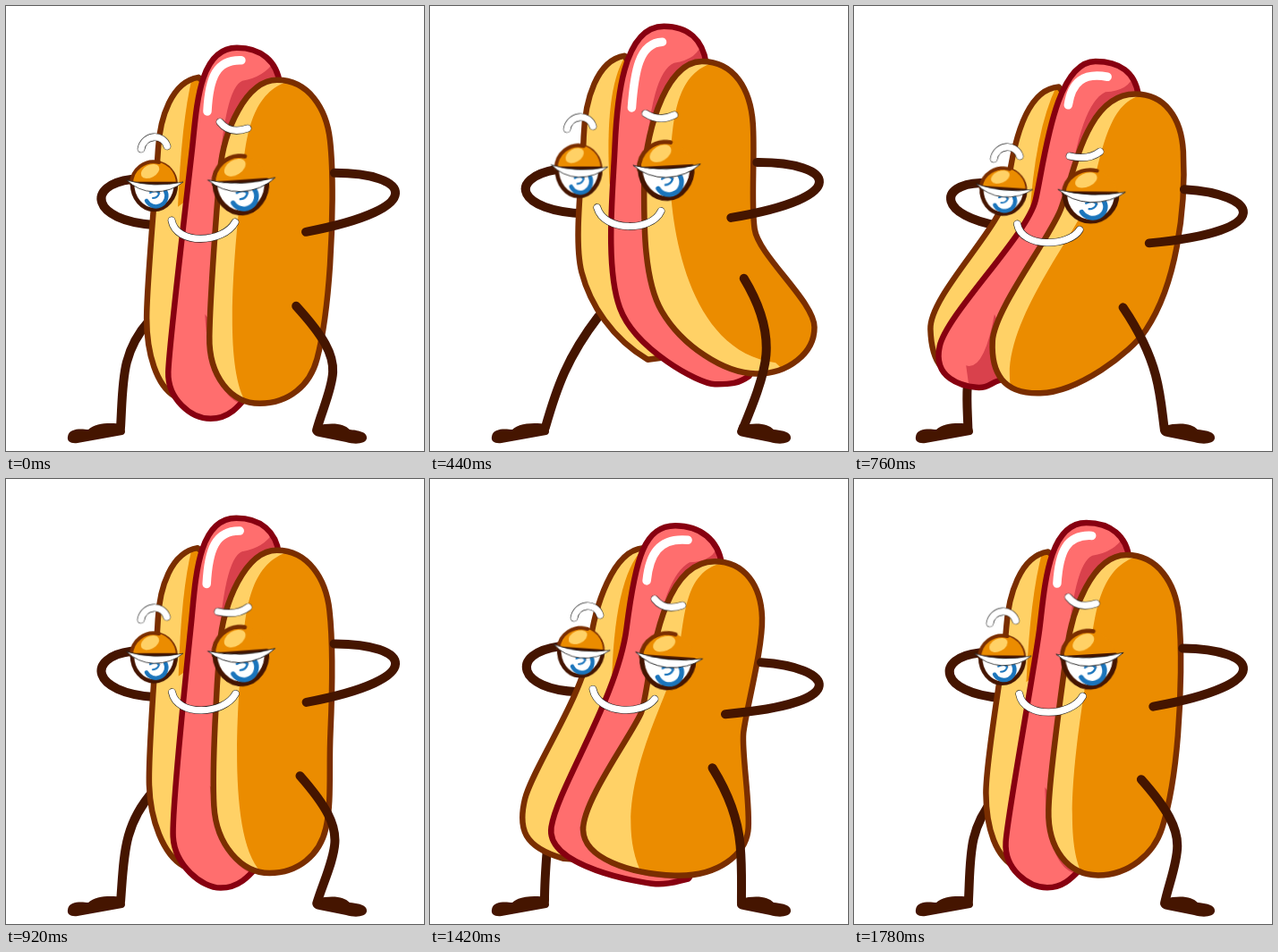
An HTML page without scripts for the animation above (1800 ms loop, 467 px wide and 498 px high).

```html
<!DOCTYPE html>
<html lang="en">
<head>
<meta charset="utf-8">
<title>Dancing hot dog</title>
<style>
html,body{margin:0;width:100%;height:100%;overflow:hidden;background:#fff}
svg{display:block;width:100vw;height:100vh}
path,g{animation:none 900ms linear infinite}
path{stroke-linecap:round;stroke-linejoin:round}
.limb{fill:none;stroke:#451500;stroke-width:10}
.crust{stroke:#7a2e00;stroke-width:6.5}
.skin{stroke:#870010;stroke-width:6.5}
.ink{fill:none;stroke:#222;stroke-width:8.6}
.chalk{fill:none;stroke:#fff;stroke-width:7.4}

.bun{animation-name:bun}
.glaze{animation-name:glaze}
.meat{animation-name:meat}
.gloom{animation-name:gloom}
.back{animation-name:back}
.shade{animation-name:shade}
.shine{animation-name:shine}
.legL{animation-name:legL}
.legR{animation-name:legR}
.armL{animation-name:armL}
.armR{animation-name:armR}
.smile{animation-name:smile}
.eyeL{animation-name:eyeL}
.eyeR{animation-name:eyeR}
.browL{animation-name:browL}
.browR{animation-name:browR}
.arch{animation-name:arch;animation-duration:1800ms}

/* body: upright, hip right, furthest right, swinging back, hip left */
@keyframes bun{
0%,to{d:path("M303 83C338 83 358 115 362 150S365 245 362 290 355 365 347 395 315 445 283 445 226 415 227 370 235 230 239 185 268 83 303 83Z");animation-timing-function:cubic-bezier(.33,.5,.67,.83)}
28.889%{d:path("M300 56C335 56 354 90 357 125S360 210 366 240 432 332 434 362 408 411 380 411 300 370 272 333 240 217 239 180 262 56 300 56Z")}
37.778%{d:path("M300 54C338 54 355 88 358 125S360 208 366 240 448 320 449 350 420 403 388 403 310 368 282 328 243 215 240 175 262 54 300 54Z");animation-timing-function:cubic-bezier(.35,-.25,.75,.4)}
57.778%{d:path("M318 92C352 92 370 120 371 155S352 262 350 285 359 370 356 395 325 446 275 444 173 425 172 393 226 286 236 262 250 92 318 92Z");animation-timing-function:cubic-bezier(.3,.4,.6,.95)}
66.667%{d:path("M320 107C352 107 370 130 371 170S369 225 360 258 338 320 315 345 215 425 168 427 114 408 116 378 206 282 226 252 252 107 320 107Z");animation-timing-function:cubic-bezier(.4,0,.7,.6)}
}
@keyframes glaze{
0%,to{d:path("M318 84C275 95 268 145 264 190S238 400 268 445L470 480 470 50Z");animation-timing-function:cubic-bezier(.33,.5,.67,.83)}
28.889%{d:path("M315 58C272 70 268 120 266 170S295 395 412 402L470 480 470 50Z")}
37.778%{d:path("M312 56C272 70 268 120 266 165S300 392 425 387L470 480 470 50Z");animation-timing-function:cubic-bezier(.35,-.25,.75,.4)}
57.778%{d:path("M325 94C285 105 285 150 278 195S195 360 240 445L470 480 470 50Z");animation-timing-function:cubic-bezier(.3,.4,.6,.95)}
66.667%{d:path("M318 110C285 120 280 190 262 228S112 345 128 428L470 480 470 50Z");animation-timing-function:cubic-bezier(.4,0,.7,.6)}
}
@keyframes meat{
0%,to{d:path("M258 47C285 47 303 62 306 88S278 425 270 435 250 462 228 462 180 440 181 410 203 205 208 160 215 47 258 47Z");animation-timing-function:cubic-bezier(.33,.5,.67,.83)}
28.889%{d:path("M252 20C278 20 294 32 298 58S385 402 370 413 345 425 328 425 251 372 229 330 200 195 201 150 205 20 252 20Z")}
37.778%{d:path("M258 15C285 15 300 30 304 56S386 395 374 405 354 415 335 415 255 370 232 324 203 195 203 155 208 15 258 15Z");animation-timing-function:cubic-bezier(.35,-.25,.75,.4)}
57.778%{d:path("M274 52C302 52 322 68 326 95S305 445 292 448 270 455 255 454 130 435 137 390 210 245 220 165 240 52 274 52Z");animation-timing-function:cubic-bezier(.3,.4,.6,.95)}
66.667%{d:path("M276 70C302 70 320 80 324 106S150 407 122 406 100 410 88 408 38 405 50 365 188 285 200 248 228 70 276 70Z");animation-timing-function:cubic-bezier(.4,0,.7,.6)}
}
@keyframes gloom{
0%,to{d:path("M300 62Q288 80 264 84Q244 92 237 200L270 180 312 90ZM222 345Q226 425 258 444L275 450 290 430Z");animation-timing-function:cubic-bezier(.33,.5,.67,.83)}
28.889%{d:path("M294 36Q288 56 260 60Q236 72 234 180L265 160 304 62ZM270 330Q310 400 372 412L376 406 380 400Z")}
37.778%{d:path("M298 32Q296 50 268 56Q242 66 238 180L265 160 308 58ZM285 335Q315 385 378 402L382 396 385 390Z");animation-timing-function:cubic-bezier(.35,-.25,.75,.4)}
57.778%{d:path("M322 72Q318 92 290 93Q262 108 248 200L285 150 330 98ZM168 390Q172 430 250 446L292 450 250 400Z");animation-timing-function:cubic-bezier(.3,.4,.6,.95)}
66.667%{d:path("M320 84Q318 103 290 103Q258 118 240 220L285 150 328 110ZM122 345Q102 400 54 380L50 414 140 412Z");animation-timing-function:cubic-bezier(.4,0,.7,.6)}
}
@keyframes back{
0%,to{d:path("M215 80C185 85 172 125 170 160S157 310 157 350 168 425 188 437L240 400 240 100Z");animation-timing-function:cubic-bezier(.33,.5,.67,.83)}
28.889%{d:path("M207 56C180 60 168 95 168 135S172 250 182 285 232 385 275 404L300 390 240 100Z")}
37.778%{d:path("M212 50C182 55 170 95 170 135S172 245 186 282 230 362 268 388L300 380 240 100Z");animation-timing-function:cubic-bezier(.35,-.25,.75,.4)}
57.778%{d:path("M238 77C205 80 184 140 178 190S115 325 107 358 105 412 150 425L220 430 250 100Z");animation-timing-function:cubic-bezier(.3,.4,.6,.95)}
66.667%{d:path("M236 96C190 98 178 190 172 232S45 330 47 368 60 410 115 413L150 400 250 120Z");animation-timing-function:cubic-bezier(.4,0,.7,.6)}
}
@keyframes shade{
0%,to{d:path("M208 80Q196 130 192 225L225 200 230 80Z");animation-timing-function:cubic-bezier(.33,.5,.67,.83)}
28.889%{d:path("M206 58Q192 90 198 190L225 180 230 58Z")}
37.778%{d:path("M212 52Q192 90 200 190L225 180 230 55Z");animation-timing-function:cubic-bezier(.35,-.25,.75,.4)}
57.778%{d:path("M238 78Q205 110 203 235L230 200 250 90Z");animation-timing-function:cubic-bezier(.3,.4,.6,.95)}
66.667%{d:path("M236 95Q205 145 198 250L225 210 250 100Z");animation-timing-function:cubic-bezier(.4,0,.7,.6)}
}
@keyframes shine{
0%,to{d:path("M225 118C227 80 235 60 263 61");animation-timing-function:cubic-bezier(.33,.5,.67,.83)}
28.889%{d:path("M218 114C220 70 227 40 248 36")}
37.778%{d:path("M221 114C224 70 228 35 252 33");animation-timing-function:cubic-bezier(.35,-.25,.75,.4)}
57.778%{d:path("M242 114C245 85 255 65 288 68");animation-timing-function:cubic-bezier(.3,.4,.6,.95)}
66.667%{d:path("M247 107C252 87 268 82 294 89");animation-timing-function:cubic-bezier(.4,0,.7,.6)}
}

/* limbs */
@keyframes legL{
0%,to{d:path("M160 352C128 388 131 420 128 472");animation-timing-function:cubic-bezier(.33,.5,.67,.83)}
28.889%{d:path("M200 328C155 380 140 420 129 472")}
37.778%{d:path("M203 330C160 380 145 420 129 472");animation-timing-function:cubic-bezier(.35,-.25,.75,.4)}
57.778%{d:path("M131 415C129 440 128 455 128 472");animation-timing-function:cubic-bezier(.3,.4,.6,.95)}
66.667%{d:path("M120 410C121 440 124 455 127 472");animation-timing-function:cubic-bezier(.4,0,.7,.6)}
}
@keyframes legR{
0%,to{d:path("M324 336C355 370 366 390 365 410S352 455 347 475");animation-timing-function:cubic-bezier(.33,.5,.67,.83)}
28.889%{d:path("M362 304C380 335 388 360 385 385S362 450 349 475")}
37.778%{d:path("M360 300C378 330 386 360 383 385S362 450 349 475");animation-timing-function:cubic-bezier(.35,-.25,.75,.4)}
57.778%{d:path("M316 323C336 355 345 385 347 410S348 450 348 475");animation-timing-function:cubic-bezier(.3,.4,.6,.95)}
66.667%{d:path("M288 338C302 365 312 390 322 415S340 455 347 475");animation-timing-function:cubic-bezier(.4,0,.7,.6)}
}
@keyframes armL{
0%,to{d:path("M140 194C90 200 94 240 165 245");animation-timing-function:cubic-bezier(.33,.5,.67,.83)}
28.889%{d:path("M140 184C86 196 99 234 172 236")}
37.778%{d:path("M140 182C86 192 97 228 175 231");animation-timing-function:cubic-bezier(.35,-.25,.75,.4)}
57.778%{d:path("M145 187C88 195 98 236 165 238");animation-timing-function:cubic-bezier(.3,.4,.6,.95)}
66.667%{d:path("M142 200C95 200 95 232 162 247");animation-timing-function:cubic-bezier(.4,0,.7,.6)}
}
@keyframes armR{
0%,to{d:path("M367 187C450 187 476 226 335 253");animation-timing-function:cubic-bezier(.33,.5,.67,.83)}
28.889%{d:path("M364 165C452 163 474 202 340 227")}
37.778%{d:path("M364 167C452 165 474 204 338 230");animation-timing-function:cubic-bezier(.35,-.25,.75,.4)}
57.778%{d:path("M370 205C448 210 478 250 330 263");animation-timing-function:cubic-bezier(.3,.4,.6,.95)}
66.667%{d:path("M370 215C450 222 477 266 327 272");animation-timing-function:cubic-bezier(.4,0,.7,.6)}
}

/* face */
@keyframes smile{
0%,to{d:path("M185 240C190 268 243 266 256 242");animation-timing-function:cubic-bezier(.33,.5,.67,.83)}
28.889%{d:path("M189 228C198 254 250 250 260 228")}
37.778%{d:path("M188 223C196 250 250 250 260 225");animation-timing-function:cubic-bezier(.35,-.25,.75,.4)}
57.778%{d:path("M182 235C188 264 238 264 251 246");animation-timing-function:cubic-bezier(.3,.4,.6,.95)}
66.667%{d:path("M181 246C186 274 240 271 250 255");animation-timing-function:cubic-bezier(.4,0,.7,.6)}
}
@keyframes eyeL{
0%,to{transform:translate(0,0) rotate(0deg) scale(1,1);animation-timing-function:cubic-bezier(.33,.5,.67,.83)}
28.889%{transform:translate(-1px,-14px) rotate(-1deg) scale(1,1.05)}
37.778%{transform:translate(0,-19px) rotate(-1deg) scale(1,1.07);animation-timing-function:cubic-bezier(.35,-.25,.75,.4)}
57.778%{transform:translate(3px,-8px) rotate(4deg) scale(1,1);animation-timing-function:cubic-bezier(.3,.4,.6,.95)}
66.667%{transform:translate(2px,9px) rotate(6deg) scale(1,.93);animation-timing-function:cubic-bezier(.4,0,.7,.6)}
}
@keyframes eyeR{
0%,to{transform:translate(0,0) rotate(-4deg) scale(1,1);animation-timing-function:cubic-bezier(.33,.5,.67,.83)}
28.889%{transform:translate(0,-20px) rotate(-6deg) scale(1,1)}
37.778%{transform:translate(1px,-21px) rotate(-5deg) scale(1,1);animation-timing-function:cubic-bezier(.35,-.25,.75,.4)}
57.778%{transform:translate(3px,3px) rotate(4deg) scale(1,.96);animation-timing-function:cubic-bezier(.3,.4,.6,.95)}
66.667%{transform:translate(3px,19px) rotate(3deg) scale(1,.85);animation-timing-function:cubic-bezier(.4,0,.7,.6)}
}
@keyframes browL{
0%,to{transform:translate(0,0);animation-timing-function:cubic-bezier(.33,.5,.67,.83)}
28.889%{transform:translate(-3px,-22px)}
37.778%{transform:translate(0,-27px);animation-timing-function:cubic-bezier(.35,-.25,.75,.4)}
57.778%{transform:translate(10px,-5px);animation-timing-function:cubic-bezier(.3,.4,.6,.95)}
66.667%{transform:translate(8px,17px);animation-timing-function:cubic-bezier(.4,0,.7,.6)}
}
@keyframes browR{
0%,to{transform:translate(0,0);animation-timing-function:cubic-bezier(.33,.5,.67,.83)}
28.889%{transform:translate(-3px,-22px)}
37.778%{transform:translate(0,-25px);animation-timing-function:cubic-bezier(.35,-.25,.75,.4)}
57.778%{transform:translate(12px,4px);animation-timing-function:cubic-bezier(.3,.4,.6,.95)}
66.667%{transform:translate(6px,26px);animation-timing-function:cubic-bezier(.4,0,.7,.6)}
}
@keyframes arch{
0%,21%,63%,to{d:path("M239 130Q250 144 270 137")}
29%,56%{d:path("M237 151Q258 156 271 146")}
}
</style>
</head>
<body>
<svg viewBox="0 0 467 498">
  <defs>
    <clipPath id="inBun"><path class="bun"/></clipPath>
    <clipPath id="inMeat"><path class="meat"/></clipPath>
    <clipPath id="inBack"><path class="back"/></clipPath>
    <g id="eye" fill="none">
      <path d="M-25-4A25 25 0 0 1 25-4Z" fill="#eb8c00"/>
      <path d="M-25-4A25 25 0 0 1 6-28" stroke="#7a2e00" stroke-width="4"/>
      <ellipse cx="-4" cy="-18" rx="11" ry="7" transform="rotate(-28 -4 -18)" fill="#ffd166"/>
      <path d="M-24-4A24.5 29 0 0 0 25-4Z" fill="#fff" stroke="#451500" stroke-width="4.6"/>
      <path d="M13 4A11.5 11.5 0 0 1-8 15" stroke="#1b75bc" stroke-width="4.5"/>
      <path d="M-4 6Q3 2 6 7Q4 12-1 12" stroke="#1b75bc" stroke-width="2"/>
      <path d="M-5 4Q4 1 7 6" stroke="#223" stroke-width=".8"/>
      <path d="M-30-8Q0 1 33-6Q20 5 0 5Q-18 4-30-8Z" fill="#fff" stroke="#222" stroke-width=".8"/>
    </g>
  </defs>

  <path class="limb armL"/>
  <path class="limb legL"/>
  <g fill="#451500">
    <path d="M69 482C70 472 84 473 92 474C100 466 118 466 130 468Q136 478 130 480L80 489C72 490 68 487 69 482Z"/>
    <path d="M346 468L343 476Q343 481 350 482L380 488C390 491 402 490 403 484C404 476 392 475 384 474C378 468 366 465 346 470Z"/>
  </g>

  <path class="back" fill="#ffd166"/>
  <path class="shade" fill="#eb8c00" clip-path="url(#inBack)"/>
  <path class="back crust" fill="none"/>

  <path class="meat" fill="#ff6e6e"/>
  <g clip-path="url(#inMeat)"><path class="gloom" fill="#d9414c"/></g>
  <path class="meat skin" fill="none"/>
  <path class="shine" fill="none" stroke="#fff" stroke-width="9.5"/>

  <path class="bun" fill="#ffd166"/>
  <g clip-path="url(#inBun)"><path class="glaze" fill="#eb8c00"/></g>
  <path class="bun crust" fill="none"/>

  <path class="limb armR"/>
  <path class="limb legR"/>

  <g transform="translate(165 203)"><g class="eyeL">
    <path d="M4-28A25 25 0 0 1 25-4" fill="none" stroke="#7a2e00" stroke-width="4"/>
    <use href="#eye"/>
  </g></g>
  <g transform="translate(262 202)"><g class="eyeR"><use href="#eye" transform="scale(1.19)"/></g></g>
  <g class="browL">
    <path class="ink" d="M151 160C154 144 175 142 180 157"/>
    <path class="chalk" d="M151 160C154 144 175 142 180 157"/>
  </g>
  <g class="browR"><path class="ink arch"/><path class="chalk arch"/></g>
  <path class="ink smile"/>
  <path class="chalk smile"/>
</svg>
</body>
</html>
```
